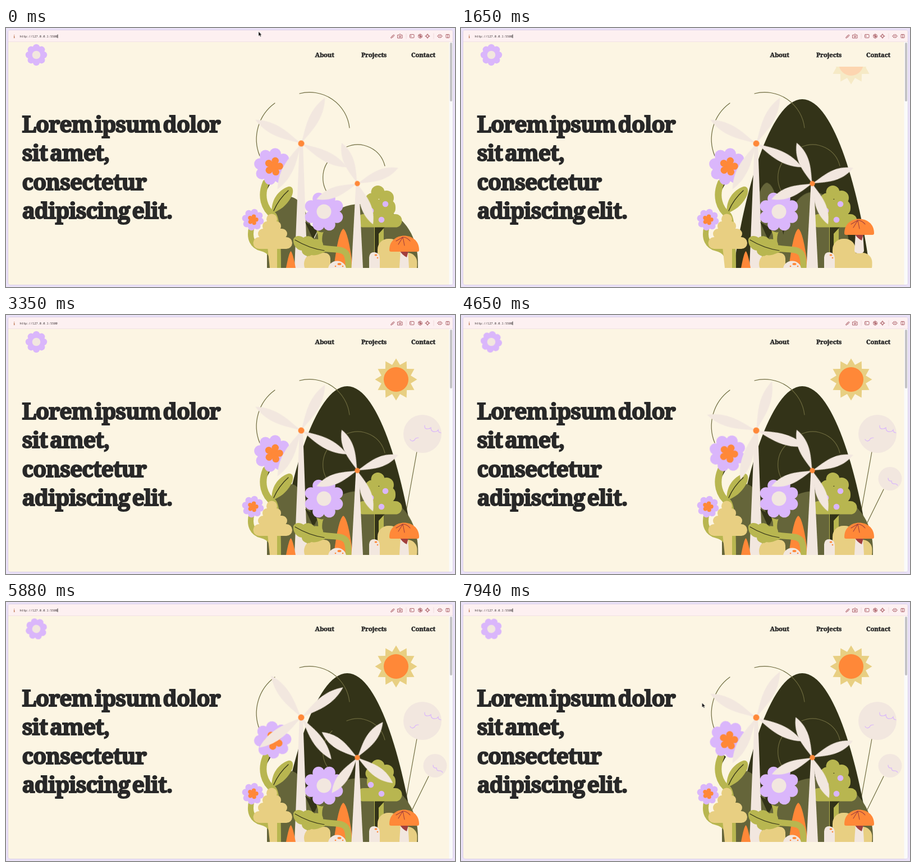
Animation of 800x462 px, one loop 8 s. Source, as an HTML page:

```html
<!DOCTYPE html>
<html lang="en">
<head>
<meta charset="utf-8">
<title>Garden landing page</title>
<style>
  html, body { margin: 0; width: 100%; height: 100%; overflow: hidden; background: #ebe2f8; }
  svg { display: block; width: 100vw; height: 100vh; }
  text { font-family: "Noto Serif", serif; font-weight: 700; fill: #282828; }
  .title { font-size: 39.5px; letter-spacing: -1.3px; word-spacing: -5px; stroke: #282828; stroke-width: 1.9; }
  .nav { font-size: 11.4px; letter-spacing: -.2px; stroke: #282828; stroke-width: .5; }
  .url { font: 5.35px "Noto Sans Mono", monospace; fill: #3b3135; }
  .line { fill: none; stroke-linecap: round; }
  .icons { stroke: #a4545c; stroke-width: .9; }
  .air { stroke: #6d6a3e; stroke-width: 1.2; }
  .stem { stroke: #b8b650; }
  .dark { fill: #333318; }
  .olive { fill: #65653a; }
  .leaf { fill: #b8b650; }
  .yellow { fill: #e8cf82; }
  .lilac { fill: #dab6fb; }
  .orange { fill: #ff8838; }
  .beige { fill: #f2e7df; }
  #hills { transform-origin: 620px 400px; }
</style>
</head>
<body>
<svg viewBox="0 0 800 462" preserveAspectRatio="none">
  <defs>
    <clipPath id="stage"><rect x="400" y="69" width="390" height="359"/></clipPath>
    <clipPath id="window"><rect x="4" y="4" width="792" height="454" rx="4"/></clipPath>
  </defs>

  <rect width="800" height="462" fill="#ebe2f8"/>
  <rect x="3.5" y="3.5" width="793" height="455" rx="4.5" fill="none" stroke="#d8cde8"/>
  <g clip-path="url(#window)">
    <rect x="4" y="4" width="792" height="454" fill="#fcf5e3"/>
    <rect x="4" y="4" width="792" height="20.5" fill="#fdf0f1"/>
    <path d="M4 24.5H796" stroke="#f0dfe3" stroke-width=".8"/>
    <rect x="789.5" y="25" width="6.5" height="433" fill="#fafafa"/>
    <rect x="791" y="26" width="4" height="105" rx="2" fill="#c3c2c4"/>
  </g>

  <text x="13.4" y="17.5" style="font-size:7px;fill:#b5653c">i</text>
  <text class="url" x="24.5" y="17">http://127.0.0.1:5500</text>
  <path id="caret" d="M92 11.5V18" stroke="#222" stroke-width=".9"/>
  <g class="line icons">
    <path d="M687 15.5l3-3q2-1 2 1l-3 3M689 13.5l-3 3q-1 2 1 1.5l3-3"/>
    <path d="M698 12.5h2l1-1.5h2l1 1.5h2v5.5h-8z"/><circle cx="702" cy="15" r="1.5"/>
    <rect x="719.5" y="11.5" width="7.5" height="6" rx="1"/><path d="M721 13.5l1.5 1-1.5 1"/>
    <circle cx="738" cy="14.5" r="3.5"/><circle cx="738" cy="14.5" r="1.3"/><path d="M735 13l6 3M738 11v7"/>
    <circle cx="751" cy="14.5" r="2.7"/><path d="M751 10.5v2.5M751 16v2.5M747 14.5h2.5M752.5 14.5h2.5"/>
    <path d="M772 11.5l-3.5 3 3.5 3M774 11.5l3.5 3-3.5 3M771 13h4M771 16h4"/>
    <rect x="784" y="11.5" width="6" height="6" rx=".7"/><path d="M787 11.5v6"/>
    <path d="M713 10v9M762 10v9" stroke="#eed7db"/>
  </g>

  <g transform="translate(54 48)"><g id="logo"></g></g>
  <text class="nav" x="550.5" y="52.3">About</text>
  <text class="nav" x="633" y="52.3">Projects</text>
  <text class="nav" x="722" y="52.3">Contact</text>
  <g id="title"></g>

  <g clip-path="url(#stage)">
    <g id="sun">
      <path id="rays" class="yellow" transform="translate(695 115)"/>
      <circle class="orange" cx="695" cy="115" r="22"/>
    </g>
    <g id="moonA">
      <path class="line air" d="M732 244L713 350"/>
      <circle class="beige" cx="742" cy="212" r="34"/>
      <path class="line" stroke="#dab6fb" stroke-width="1.2" d="M746 197q-1 7 6 6 3 0 5-2 0 8 8 7 3 0 5-3 0 5 5 5M720 222q3 5 8 1 1-4 7-4"/>
    </g>
    <g id="moonB">
      <path class="line air" d="M753 311L724 370"/>
      <circle class="beige" cx="764.5" cy="292" r="21"/>
      <path class="line" stroke="#dab6fb" stroke-width="1.2" d="M761 291q0 6 6 5 0 6 6 5 3 0 5 3"/>
    </g>
    <path id="mountain" class="dark" d="M486 428C503 300 550 127 608 127C666 127 711 300 728 428Z"/>
    <g id="hills" class="olive">
      <path d="M465 500V390C468 340 484 301 505 301C528 301 543 345 553 390V500Z"/>
      <path d="M542 500V400C553 350 585 314 630 314C690 314 734 355 734 420V500Z"/>
    </g>
    <g class="line air">
      <path d="M523 117A71.4 71.4 0 0 1 612 178"/>
      <path d="M479 134A79.5 79.5 0 0 0 452 228"/>
      <path d="M581 230A50 50 0 0 0 579 302"/>
      <path d="M607 212A50 50 0 0 1 675 246"/>
    </g>

    <!-- left plants -->
    <path class="dark" d="M461 268L472 276L464 290Z"/>
    <path class="line stem" stroke-width="12" d="M463 276C453 300 460 322 476 334Q484 342 484 428"/>
    <path class="leaf" d="M474 331C471 308 485 289 503 283C513 281 513 294 508 302C499 318 489 324 474 331Z"/>
    <path class="line" stroke="#333318" stroke-width="1.3" d="M477 326Q486 305 503 290"/>
    <path class="line stem" stroke-width="10" d="M438 354C432 376 440 389 455 393C470 397 478 405 478 432"/>
    <g transform="translate(477 247)"><g id="flowerA"></g></g>
    <g id="flowerB" transform="translate(440 342)"></g>
    <g class="yellow">
      <circle cx="473.5" cy="341" r="9.5"/>
      <rect x="457" y="345" width="33" height="17" rx="8"/>
      <rect x="449" y="358" width="52" height="18" rx="9"/>
      <rect x="440.5" y="373" width="69.5" height="21" rx="10.5"/>
      <path d="M466 390L470 428H483V390Z"/>
    </g>

    <!-- right tree -->
    <path class="leaf" d="M656 350H673V428H656Z"/>
    <path class="dark" d="M657 355H675L664 367V428H657Z"/>
    <g class="leaf">
      <circle cx="662.5" cy="293" r="12"/>
      <circle cx="652" cy="306" r="11.5"/>
      <circle cx="678" cy="303" r="13"/>
      <rect x="643" y="306" width="51" height="29" rx="13"/>
      <rect x="625.5" y="332" width="80" height="23.5" rx="11.5"/>
    </g>
    <g class="lilac">
      <circle cx="650" cy="326" r="5.3"/><circle cx="676" cy="314" r="5.3"/><circle cx="669" cy="342" r="5.3"/>
    </g>

    <!-- centre plants -->
    <path class="beige" d="M523 206H529L537 428H514Z"/>
    <path class="orange" d="M499 428Q504 401 507.5 398Q511 401 516 428Z"/>
    <path class="orange" d="M584 428Q592 363 601 358Q610 363 618 428Z"/>
    <path class="dark" d="M533 346L556 360L547 377Z"/>
    <path class="leaf" d="M553 361Q566 368 567 361Q560 374 566 394L552 392Q560 376 553 361Z"/>
    <path class="line stem" stroke-width="11" d="M552 390C574 398 600 390 607 404Q611 413 610 432"/>
    <g class="yellow">
      <circle cx="551" cy="421" r="20"/><rect x="540" y="401" width="38" height="30" rx="10"/>
    </g>
    <path class="leaf" d="M512 377C514 370 524 369 530 374C536 369 545 371 549 377C558 375 566 381 565 388Q574 394 568 400C560 402 554 407 544 405C537 410 527 404 527 397C517 396 511 386 512 377Z"/>
    <path class="line" stroke="#333318" stroke-width="1.2" d="M515 378Q540 393 567 397"/>
    <g id="flowerC" transform="translate(566.5 327.5)"></g>
    <ellipse class="beige" cx="590" cy="430" rx="16" ry="14.5"/>
    <g class="orange">
      <ellipse cx="594" cy="421" rx="3.5" ry="2"/><circle cx="587" cy="425" r="1.3"/><circle cx="600" cy="425" r="1.3"/>
    </g>

    <path class="beige" d="M623.5 277H628.5L636 428H615.5Z"/>
    <g transform="translate(526 206) rotate(-62.6)"><g id="millA"></g></g>
    <g transform="translate(626 277.5) rotate(-21)"><g id="millB"></g></g>

    <g class="yellow">
      <rect x="662" y="376" width="41" height="60" rx="19"/><rect x="690" y="401" width="42.5" height="40" rx="17"/>
    </g>
    <path class="beige" d="M647 428V409Q648 399 657 400Q666 401 666 412V428Z"/>
    <g class="orange">
      <ellipse cx="659" cy="405" rx="2.4" ry="1.5"/><circle cx="662" cy="410" r="1.3"/>
    </g>
    <g id="mushroom">
      <path class="beige" d="M703 396H716L718 427Q718 432 710 432Q701 432 701 427Z"/>
      <path d="M702 398H717L714 409Q706 405 702 398Z" fill="#a13f3d"/>
      <path class="orange" d="M683 396C683 362 736 362 736 396Q736 399 733 399H686Q683 399 683 396Z"/>
      <path class="line" stroke="#a13f3d" stroke-width="1.1" d="M707 373L710 388M707 373L695 380M707 373Q714 373 720 380M707 373L699 386"/>
    </g>
  </g>

  <path id="cursor" d="M0 0V8L1.9 6.3L3.1 9L4.5 8.4L3.3 5.8H5.7Z" fill="#111" stroke="#fff" stroke-width=".4"/>
</svg>
<script>
const LOOP = 8000;
const $ = id => document.getElementById(id);

const disc = (x, y, r, cls) => `<circle class="${cls}" cx="${x}" cy="${y}" r="${r}"/>`;

function petals(count, reach, radius, cls, turn = 0) {
  let out = disc(0, 0, reach * .9, cls);
  for (let i = 0; i < count; i++) {
    const a = turn + i * 2 * Math.PI / count;
    out += disc((reach * Math.cos(a)).toFixed(2), (reach * Math.sin(a)).toFixed(2), radius, cls);
  }
  return out;
}

function mill(length, hub) {
  const blade = `M0 0C${length * .25} -4 ${length * .6} -18 ${length} 0C${length * .6} 18 ${length * .25} 4 0 0Z`;
  return [0, 90, 180, 270].map(a =>
    `<path class="beige" transform="rotate(${a})" d="${blade}"/>`).join("") + disc(0, 0, hub, "orange");
}

function star(points, outer, inner) {
  const corners = Array.from({ length: points * 2 }, (_, i) => {
    const a = i * Math.PI / points - Math.PI / 2, r = i % 2 ? inner : outer;
    return `${(r * Math.cos(a)).toFixed(1)} ${(r * Math.sin(a)).toFixed(1)}`;
  });
  return `M${corners.join("L")}Z`;
}

$("logo").innerHTML = petals(8, 13, 6.2, "lilac") + disc(0, 0, 7.3, "beige");
$("flowerA").innerHTML = `<g transform="translate(-2 0)">${petals(8, 23, 10.3, "lilac", .2)}</g>` +
  petals(5, 10.5, 6.3, "orange", -.05);
$("flowerB").innerHTML = petals(8, 13.5, 6.1, "lilac", .2) + petals(5, 6, 3.7, "orange", -.05);
$("flowerC").innerHTML = petals(8, 25, 10.7, "lilac", Math.PI / 8) + disc(0, 0, 13, "beige");
$("millA").innerHTML = mill(92, 5.5);
$("millB").innerHTML = mill(78, 4.7);
$("rays").setAttribute("d", star(12, 37.5, 27));
["Lorem ipsum dolor", "sit amet,", "consectetur", "adipiscing elit."].forEach((line, i) => {
  $("title").innerHTML += `<text class="title" x="28.5" y="${185.5 + i * 51.6}">${line}</text>`;
});

// steps: [ms, value, easing to the next step]
function play(id, prop, steps, duration = LOOP) {
  const all = [...steps];
  if (all[0][0] > 0) all.unshift([0, all[0][1]]);
  const last = all[all.length - 1];
  if (last[0] < duration) all.push([duration, last[1]]);
  $(id).animate(all.map(([ms, value, easing = "linear"]) =>
    ({ offset: ms / duration, [prop]: value, easing })), { duration, iterations: Infinity });
}

const turn = (id, from, to, degrees) =>
  play(id, "transform", [[from, "rotate(0deg)"], [to, `rotate(${degrees}deg)`]]);
const fade = (id, from, to) =>
  play(id, "opacity", [[from, 0, "ease"], [to, 1]]);
const drop = y => `translate(0px, ${y}px)`;

play("caret", "opacity", [[0, 1, "step-end"], [50, 0, "step-end"], [550, 1, "step-end"]], 1000);
play("cursor", "transform", [
  [0, "translate(450px, 6.5px)"], [80, "translate(450px, 6.5px)", "ease-in"],
  [350, "translate(456px, -14px)"], [7500, "translate(452px, -14px)", "ease-in-out"],
  [7900, "translate(429.5px, 180px)"]]);

play("mountain", "transform", [[250, drop(301), "ease"], [1250, drop(0)]]);
fade("mountain", 250, 1250);
play("sun", "transform", [[1350, drop(-74), "ease"], [2850, drop(0)]]);
fade("sun", 1350, 2850);
fade("moonA", 2400, 3250);
fade("moonB", 3380, 4120);

play("hills", "transform", [
  [1550, 1, 1], [1650, .65, 1.25], [1750, 1.1, .9], [1900, .95, 1.05], [2000, 1.05, .95], [2250, 1, 1]
].map(([ms, x, y]) => [ms, `scale(${x}, ${y})`, "ease"]));
play("mushroom", "transform", [
  [1450, 0], [1650, -30], [1680, -30], [1780, 0], [1950, -15], [2050, 0], [2150, -4], [2250, 0]
].map(([ms, y]) => [ms, drop(y), "ease-out"]));

turn("millA", 3870, 7370, 360);
turn("millB", 5330, LOOP, 360 * (LOOP - 5330) / 3500);
turn("logo", 4200, LOOP, 68);
turn("flowerA", 4200, LOOP, 68);
</script>
</body>
</html>
```
